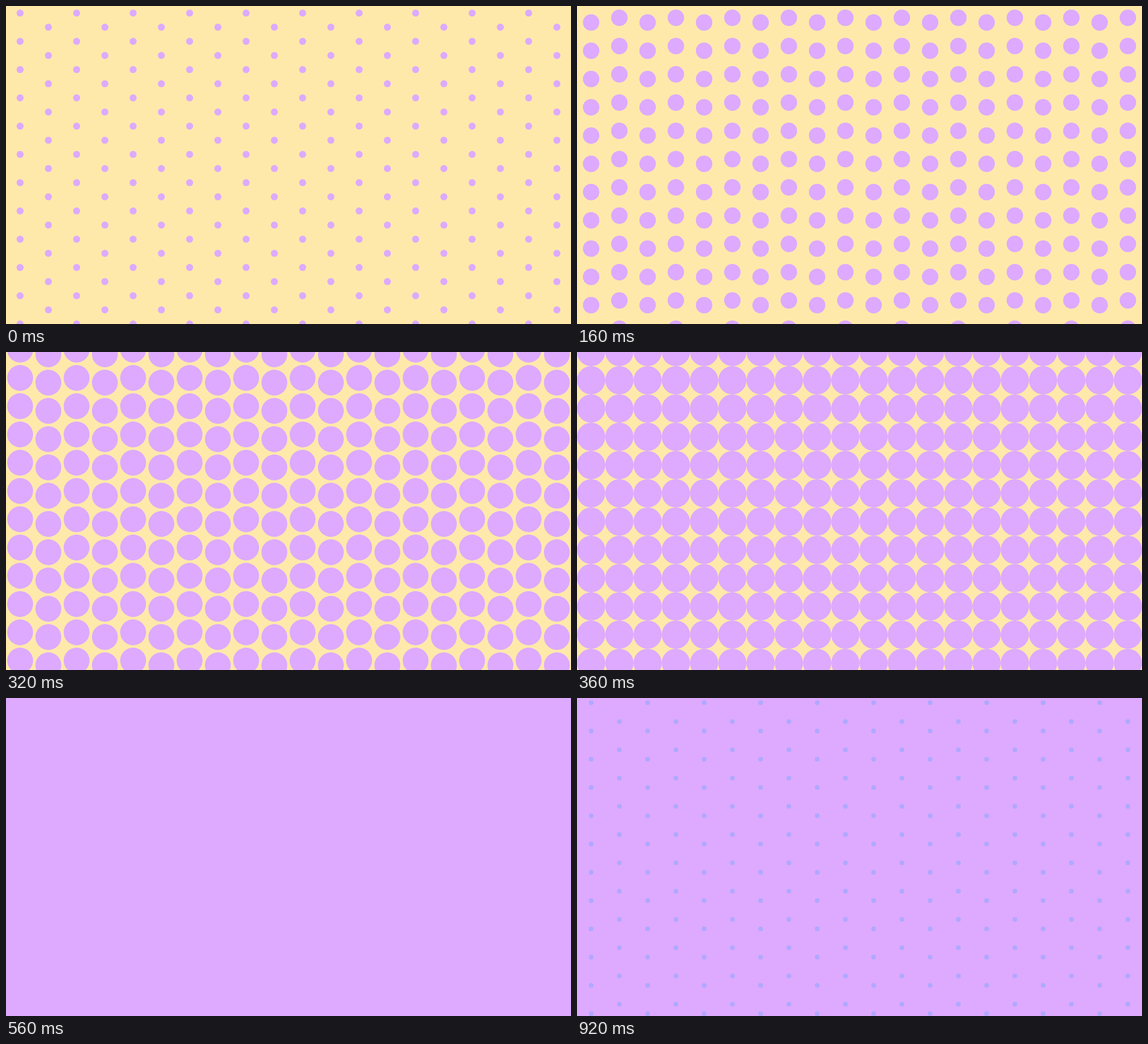
Recreate the animation shown at these times as an HTML page with a canvas. Size 960x540 px, loop 960 ms.

```html
<!DOCTYPE html>
<html lang="en">
<head>
<meta charset="utf-8">
<title>Polka dots</title>
<style>
  html, body { margin: 0; width: 100%; height: 100%; overflow: hidden; background: #ffe9aa; }
  canvas { display: block; }
</style>
</head>
<body>
<canvas id="stage" width="960" height="540"></canvas>
<script>
const ctx = document.getElementById('stage').getContext('2d');
const WIDTH = 960, HEIGHT = 540, CELL = 48;
const LOOP = 960, STEP = 40, COVERED = 560;
const YELLOW = '#ffe9aa', PURPLE = '#ddaaff', BLUE = '#b0a8ff';

// Neighbouring columns drift in opposite directions while the dots grow.
function drawDots(phase, color) {
  const radius = 6 + phase / 20;
  if (radius <= 0) return;
  const drift = 12 + phase / 10;
  ctx.fillStyle = color;
  for (let col = 0; col < WIDTH / CELL; col++) {
    const x = CELL * (col + 0.5);
    const offset = (col % 2 ? CELL - drift : drift) % CELL;
    for (let y = offset - CELL; y < HEIGHT + CELL; y += CELL) {
      ctx.beginPath();
      ctx.arc(x, y, radius, 0, Math.PI * 2);
      ctx.fill();
    }
  }
}

function draw(time) {
  const t = Math.floor((time % LOOP) / STEP) * STEP;
  const growing = t < COVERED;
  ctx.fillStyle = growing ? YELLOW : PURPLE;
  ctx.fillRect(0, 0, WIDTH, HEIGHT);
  if (growing) drawDots(t, PURPLE);
  else drawDots(t - LOOP, BLUE);
}

function tick() {
  draw(performance.now());
  requestAnimationFrame(tick);
}
tick();
</script>
</body>
</html>
```
